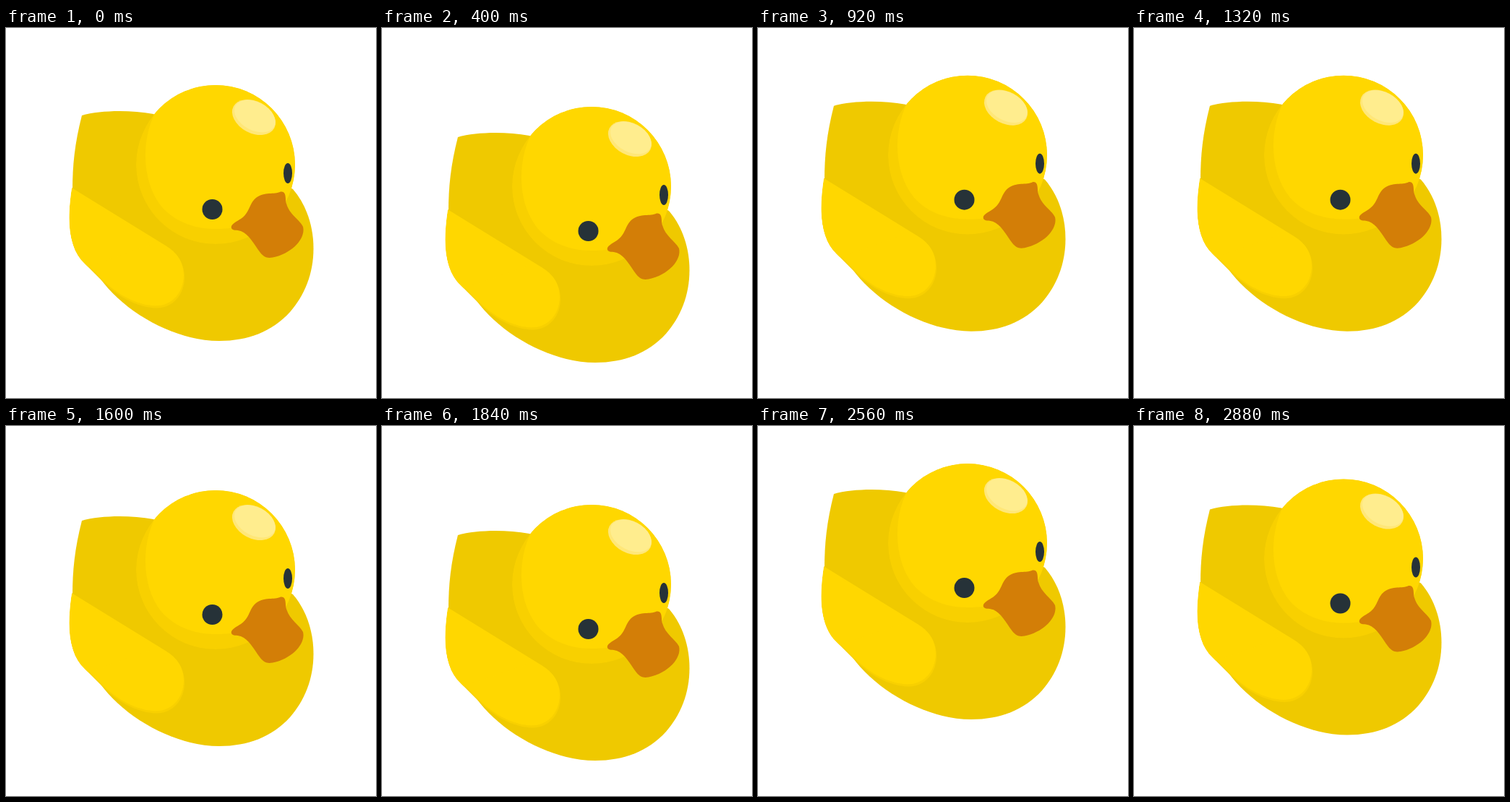
An HTML page that plays this animation: 512x512 px, repeating every 2920 ms.

```html
<!DOCTYPE html>
<html lang="en">
<head>
<meta charset="utf-8">
<title>Bobbing duck</title>
<style>
html, body { margin: 0; height: 100%; overflow: hidden; background: #fff; }
svg { display: block; width: 100%; height: 100%; }
</style>
</head>
<body>
<svg viewBox="0 0 512 512">
  <defs>
    <clipPath id="head"><circle cx="290" cy="189" r="110"/></clipPath>
    <clipPath id="wing"><path id="wingShape" d="M92 224L222 304Q247 319 247 345C247 369 231 387.500 208 387.500C182 387 153 371 132 349L109 326C87 305 85 271 92 224Z"/></clipPath>
  </defs>
  <g id="duck">
    <path fill="#efc900" d="M105 121C130 114 170 113 204 119L397 223C416 245 425.500 275 425.500 305C425.500 340 413 370 393 393C368 420 335 433 295 433C235 433 165 395 130 346L92 224C92 190 95 160 105 121Z"/>
    <use href="#wingShape" fill="#f8d000"/>
    <use href="#wingShape" fill="#ffd700" clip-path="url(#wing)" x="-1" y="-3"/>
    <path fill="#ffd700" clip-path="url(#wing)" d="M80 215H150L200 300L100 335H80Z"/>
    <g clip-path="url(#head)">
      <circle cx="290" cy="189" r="110" fill="#f8d000"/>
      <path fill="#ffd700" d="M212 107C185 150 187 213 216 248C238 272 272 283 316 276L400 240V70H230Z"/>
    </g>
    <g transform="rotate(28 343 123.500)">
      <ellipse cx="343" cy="123.500" rx="32" ry="22" fill="#ffe778"/>
      <ellipse cx="343.500" cy="121.500" rx="30.500" ry="19.500" fill="#ffed8e"/>
    </g>
    <g fill="#263238">
      <circle cx="285.500" cy="251" r="14"/>
      <ellipse cx="390" cy="201" rx="6" ry="14"/>
    </g>
    <path fill="#d37e07" d="M312 277C310 272 319 268 325 264C338 255 336 243 346 235C358 226 371 231 380 226.500C389 225 386 238 388 243C392 258 406 265 411 275C415 291 396 312 369 317.500C361 319 357 317 352 311C343 299 336 285 325 281C319 279 314 281 312 277Z"/>
  </g>
</svg>
<script>
const LOOP = 2920, STEP = 40;
// [time in ms, vertical offset]
const keys = [[0, 0], [400, 30], [1120, -30], [1840, 30], [2240, -2.7], [2600, -30], [2880, -5.5], [2920, -2]];
const duck = document.getElementById("duck");

function offset(t) {
  const i = keys.findIndex(k => k[0] > t);
  const [t0, y0] = keys[i - 1], [t1, y1] = keys[i];
  return y0 + (y1 - y0) * (t - t0) / (t1 - t0);
}

function draw() {
  const t = Math.floor(performance.now() % LOOP / STEP) * STEP;
  duck.setAttribute("transform", `translate(0 ${offset(t)})`);
  requestAnimationFrame(draw);
}
draw();
</script>
</body>
</html>
```
